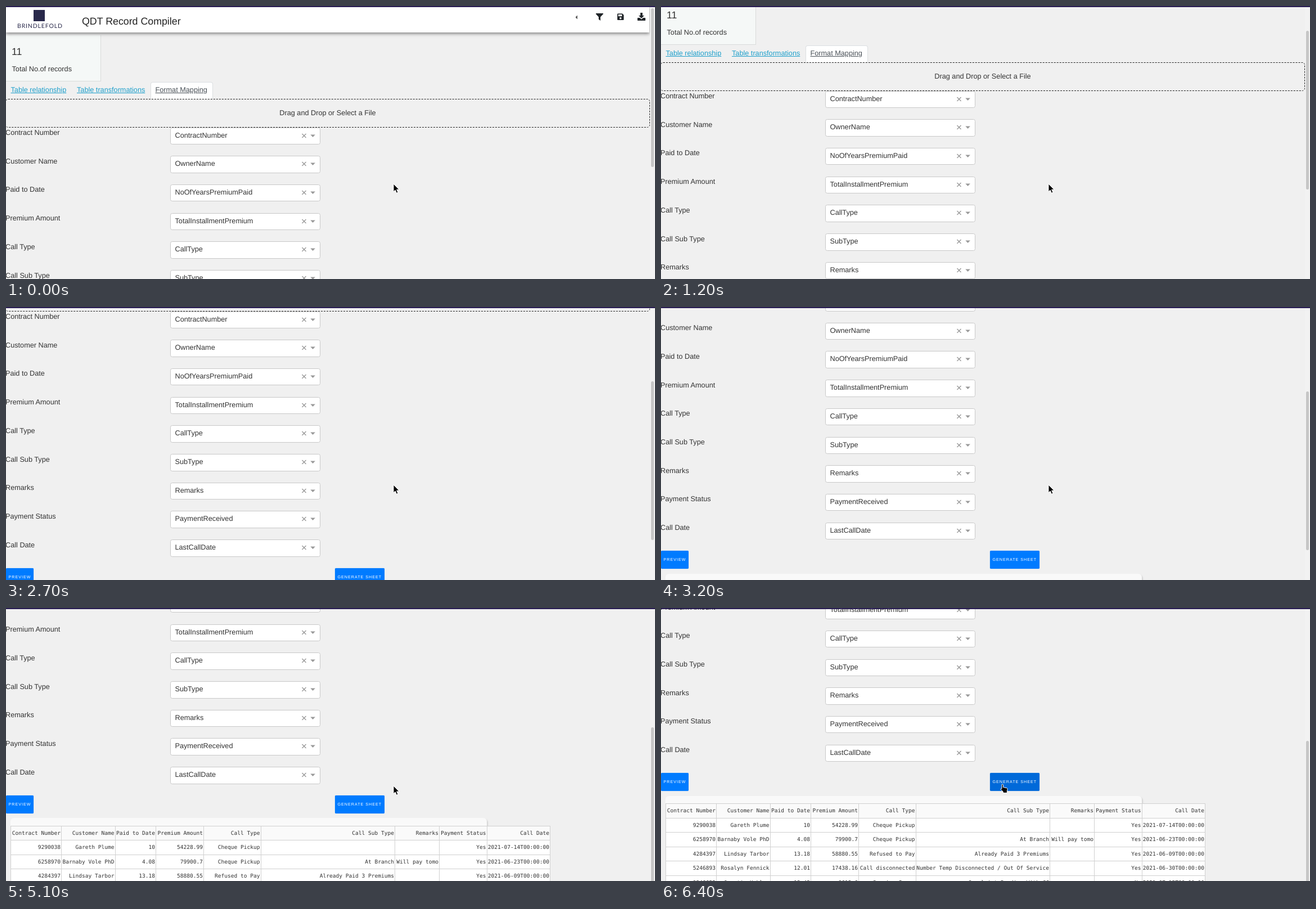
These frames come from a looping animation (1154 by 485 pixels, 8000 ms). An HTML page:

```html
<!DOCTYPE html>
<html lang="en">
<head>
<meta charset="utf-8">
<title>Format mapping</title>
<style>
@property --s { syntax: "<number>"; inherits: true; initial-value: 0; }
html, body { margin: 0; width: 100%; height: 100%; overflow: hidden; }
* { box-sizing: border-box; }
#stage {
  position: relative; width: 100%; height: 100%; overflow: hidden;
  background: #f0f0f0; color: #333;
  font: 12.7px/20px "Liberation Sans", Arial, sans-serif;
  text-rendering: geometricPrecision; white-space: nowrap;
  animation: scroll 8s step-end infinite;
}
#stage div, #stage svg, #stage a { position: absolute; }
#page { left: 0; top: calc(var(--s) * -1px); width: 1145px; height: 1000px; }
#edge { left: 0; top: 0; width: 100%; height: 2px; background: #281c52; }
#track { left: 1145px; top: 2px; right: 0; bottom: 0; background: #f2f2f2; }
#thumb {
  left: 1147px; top: calc(4px + var(--s) * .613px); width: 5px; height: 282px;
  border-radius: 3px; background: #c6c6c6;
}

#header {
  left: 0; top: 0; width: 1144px; height: 47px; background: #fff;
  box-shadow: 0 2px 6px rgba(0, 0, 0, .5);
}
#mark { left: 49px; top: 7px; width: 20px; height: 20px; background: #28284a; }
#word {
  left: 20px; top: 26px; color: #28284a;
  font: 10.5px/20px Lato, sans-serif; letter-spacing: .85px;
}
#title { left: 135px; top: 17px; font-size: 17.8px; color: #222; }
#icons { left: 1000px; top: 0; }
#card {
  left: -1px; top: 52px; width: 170px; height: 82px;
  background: #f5f8f7; border: solid #d8dbda; border-width: 0 1px 1px 0;
}
#count { left: 11px; top: 19px; font-size: 17.8px; }
#total { left: 11.5px; top: 50px; }
a { top: 139px; color: #1e9fcb; text-decoration: underline; }
#tab {
  left: 257px; top: 135px; width: 111px; height: 31px; background: #fff;
  border: 1px solid #dcdfe2; border-bottom: 0; border-radius: 4px 4px 0 0;
}
#drop {
  left: -1px; top: 165px; width: 1146px; height: 51px; line-height: 49px;
  text-align: center; border: 1px dashed #222; border-radius: 5px; background: #f0f0f0;
}

.label { left: -1px; }
.select {
  left: 292px; width: 267px; height: 30.5px; padding-left: 7.5px; line-height: 26.5px;
  background: #fff; border: 1px solid #c8c8c8; border-radius: 3.5px;
}
.select svg { left: 232px; top: 7px; }
.button {
  --fill: #007bff;
  top: 671.8px; height: 32px; line-height: 31px; padding-left: 4.5px; border-radius: 2px;
  background: var(--fill); box-shadow: 0 0 1px var(--fill);
  color: #fff; font-size: 7.2px; letter-spacing: .98px;
}
#preview { left: 0; width: 49px; }
#generate { left: 585px; width: 88px; animation: hover 8s step-end infinite; }
#panel {
  left: 8px; top: 712px; width: 847px; height: 260px; border-radius: 6px;
  background: #f9f9f9; box-shadow: 2px 2px 2px lightgrey;
}
#table {
  left: 8px; top: 725.5px; display: grid; grid-auto-rows: 25.5px;
  grid-template-columns: 90px 95.5px 72.5px 85px 101.5px 238.5px 79px 84.5px 112.5px;
  border: solid #d0d0d0; border-width: 1px 0 0 1px;
  font: 9.55px/25px "DejaVu Sans Mono", monospace;
}
#table span {
  padding-right: 1px; text-align: right; background: #fff;
  border: solid #d0d0d0; border-width: 0 1px 1px 0;
}
#table span:nth-child(-n + 9) { background: #fafafa; }

#cursor { left: 689px; top: 316px; animation: point 8s step-end infinite; }
#arrow { animation: leave 8s step-end infinite; }
#hand { visibility: hidden; animation: enter 8s step-end infinite; }
#cursor path { fill: #000; stroke: #fff; stroke-linejoin: round; }

@keyframes scroll {
  0% { --s: 0; }
  6.25% { --s: 9; }
  7.5% { --s: 28; }
  8.75% { --s: 48; }
  10% { --s: 62; }
  11.25% { --s: 63; }
  15% { --s: 65; }
  20% { --s: 104; }
  27.5% { --s: 144.5; }
  31.25% { --s: 160; }
  32.5% { --s: 188; }
  33.75% { --s: 208; }
  38.75% { --s: 224; }
  40% { --s: 238.5; }
  46.25% { --s: 242; }
  55% { --s: 262.5; }
  56.25% { --s: 284; }
  58.75% { --s: 288; }
  61.25% { --s: 300; }
  62.5% { --s: 320; }
  63.75% { --s: 339; }
  65% { --s: 362; }
  66.25% { --s: 377.5; }
  70%, 100% { --s: 378.5; }
}
@keyframes point {
  0% { transform: none; }
  73.75% { transform: translate(-4px, 3px); }
  75% { transform: translate(-18px, 7px); }
  76.25% { transform: translate(-41px, 6px); }
  77.5% { transform: translate(-60px, 2px); }
  78.75% { transform: translate(-74px, -1px); }
  80%, 100% { transform: translate(-81px, -2px); }
}
@keyframes hover { 0% { --fill: #007bff; } 76.25%, 100% { --fill: #0069d9; } }
@keyframes leave { 0% { visibility: visible; } 76.25%, 100% { visibility: hidden; } }
@keyframes enter { 0% { visibility: hidden; } 76.25%, 100% { visibility: visible; } }
</style>
</head>
<body>
<div id="stage">
  <div id="page">
    <div id="card">
      <div id="count">11</div>
      <div id="total">Total No.of records</div>
    </div>
    <div id="header">
      <div id="mark"></div>
      <div id="word">BRINDLEFOLD</div>
      <div id="title">QDT Record Compiler</div>
      <svg id="icons" width="144" height="40" fill="#212529">
        <path fill="#555" d="M16 16.5v7l-3.5-3.5z"/>
        <path d="M49.5 13h12q1 .5 .4 1.3l-4.9 5.2v6.5l-3.2-2.4v-4.1l-4.9-5.2q-.4-.8 .6-1.3z"/>
        <path fill-rule="evenodd" d="M88 13.5h8l2.5 2.5v8q0 1-1 1h-9.5q-1 0-1-1v-9.5q0-1 1-1zM88.7 15v3.3h6.5v-3.3zM92.7 20a1.7 1.7 0 1 0 .01 0z"/>
        <path d="M128 12h3.8v5h3l-4.9 5-4.9-5h3z"/>
        <path d="M123.5 21h3.5l2.9 2.7 2.9-2.7h3.5q.7 0 .7 .7v3.5q0 .7-.7 .7h-12.8q-.7 0-.7-.7v-3.5q0-.7 .7-.7z"/>
      </svg>
    </div>
    <a style="left:8.5px">Table relationship</a>
    <a style="left:126px">Table transformations</a>
    <div id="tab"></div>
    <a style="left:265.5px;color:#495057">Format Mapping</a>
    <div id="fields"></div>
    <div id="drop">Drag and Drop or Select a File</div>
    <div class="button" id="preview">PREVIEW</div>
    <div class="button" id="generate">GENERATE SHEET</div>
    <div id="panel"></div>
    <div id="table"></div>
  </div>
  <div id="track"></div>
  <div id="thumb"></div>
  <div id="edge"></div>
  <div id="cursor">
    <svg id="arrow" width="14" height="20" style="left:-1px;top:-1px">
      <path d="M1 1v14l3.2-2.9 2.3 5.2 2.5-1.1-2.3-5.1h4.3z"/>
    </svg>
    <svg id="hand" width="16" height="19" style="left:-5px;top:-2px">
      <path d="M3 1.5q1.5-1.2 2.5 .3v4.7l6 1.2q1.7 .4 1.6 2l-.8 4v2.8h-7v-2l-4.200-4.300q-.5-1.600 1.900-1.400z"/>
    </svg>
  </div>
</div>
<script>
const fields = [
  ["Contract Number", "ContractNumber"],
  ["Customer Name", "OwnerName"],
  ["Paid to Date", "NoOfYearsPremiumPaid"],
  ["Premium Amount", "TotalInstallmentPremium"],
  ["Call Type", "CallType"],
  ["Call Sub Type", "SubType"],
  ["Remarks", "Remarks"],
  ["Payment Status", "PaymentReceived"],
  ["Call Date", "LastCallDate"]
];
const records = [
  "9290038|Gareth Plume|10|54228.99|Cheque Pickup|||Yes|2021-07-14",
  "6258970|Barnaby Vole PhD|4.08|79900.7|Cheque Pickup|At Branch|Will pay tomo|Yes|2021-06-23",
  "4284397|Lindsay Tarbor|13.18|58880.55|Refused to Pay|Already Paid 3 Premiums||Yes|2021-06-09",
  "5246893|Rosalyn Fennick|12.01|17438.16|Call disconnected|Number Temp Disconnected / Out Of Service||Yes|2021-06-30",
  "9346653|Quentin Hobley|12.43|8615.6|Service Issue|Complaint Pending With CC||No|2021-07-12"
];
const marks = `<svg width="28" height="14">
  <path d="M1.5 3l7 7m0-7l-7 7" stroke="#999" stroke-width="1.4"/>
  <path d="M16.3 4.6h8.6l-4.3 4.3z" fill="#999"/></svg>`;

document.getElementById("fields").innerHTML = fields.map(([label, value], i) => {
  const y = i * 50.7;
  return `<div class="label" style="top:${215 + y}px">${label}</div>
    <div class="select" style="top:${215.5 + y}px">${value}${marks}</div>`;
}).join("");

const rows = [fields.map(f => f[0]), ...records.map(r => (r + "T00:00:00").split("|"))];
document.getElementById("table").innerHTML = rows.flat().map(c => `<span>${c}</span>`).join("");
</script>
</body>
</html>
```
